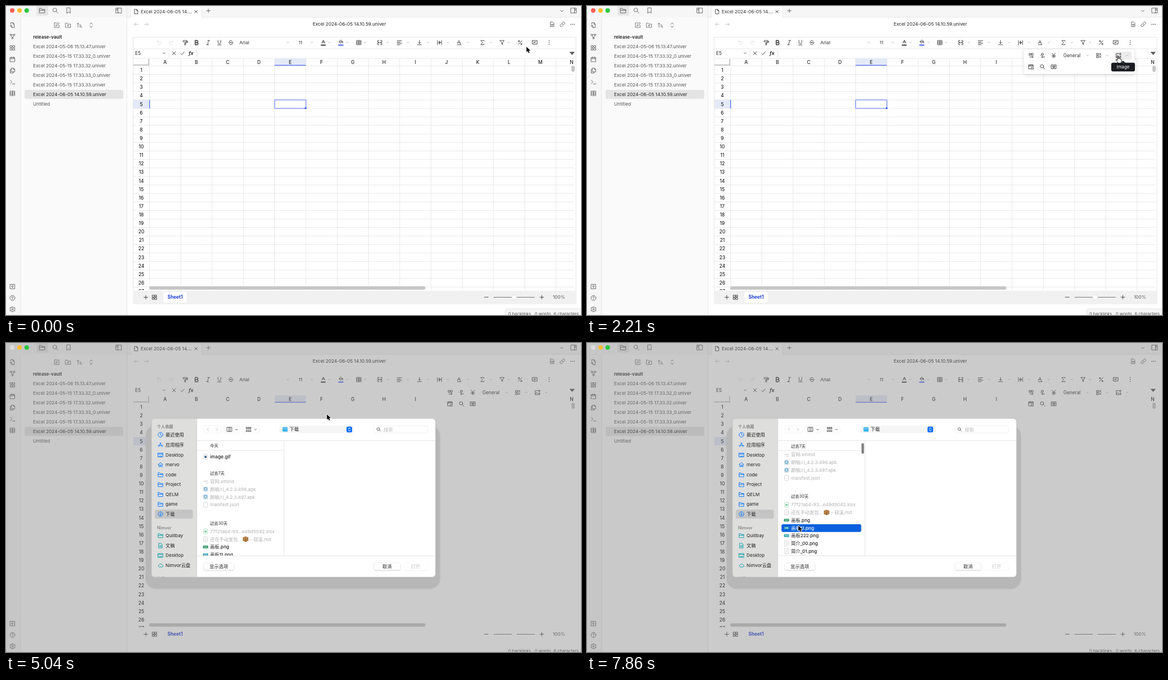
These frames come from a looping animation (1020x549 px, 8000 ms). An HTML page with a canvas:

```html
<!DOCTYPE html>
<html lang="zh-CN">
<head>
<meta charset="utf-8">
<title>Spreadsheet image upload</title>
<style>
html, body { margin: 0; width: 100%; height: 100%; overflow: hidden; background: #fff; }
canvas { display: block; width: 1020px; height: 549px; }
</style>
</head>
<body>
<canvas></canvas>
<script>
const W = 1020, H = 549, LOOP = 8000, STEP = 148.15;
const canvas = document.querySelector('canvas'), c = canvas.getContext('2d');
const ratio = window.devicePixelRatio || 1;
canvas.width = W * ratio;
canvas.height = H * ratio;

const FONT = 'Inter, "Noto Sans CJK SC", "Noto Sans CJK", sans-serif';
const INK = '#303030', BLUE = '#2c53f1', MAC = '#0a7aff', TEAL = '#10a0ab';

// Icon outlines on a 24 unit square
const ICONS = {
  chev: 'M5 8l7 7 7-7', left: 'M15 4l-8 8 8 8', right: 'M9 4l8 8-8 8',
  updown: 'M7 9l5-6 5 6M7 15l5 6 5-6', cross: 'M4 4l16 16M20 4L4 20', plus: 'M12 3v18M3 12h18',
  check: 'M3 13l6 6L21 5', minus: 'M3 12h18', back: 'M21 12H3M10 5l-7 7 7 7', fwd: 'M3 12h18M14 5l7 7-7 7',
  folder: 'M2 20V4h7l3 4h10v12zM2 11h20', folderPlus: 'M2 20V4h7l3 4h10v12zM12 11v6M9 14h6',
  search: 'M17 10a7 7 0 1 0-14 0 7 7 0 0 0 14 0M15 15l7 7', bookmark: 'M6 2h12v20l-6-5-6 5z',
  panel: 'M2 3h20v18H2zM9 3v18M4 7h3M4 11h3', panelR: 'M2 3h20v18H2zM15 3v18M17 7h3M17 11h3',
  file: 'M5 2h9l5 5v15H5zM14 2v6h5', fileSearch: 'M5 8V2h9l5 5v15H9M14 2v6h5M9 15a3 3 0 1 0-6 0 3 3 0 0 0 6 0M8 17l3 4',
  graph: 'M8 5a3 3 0 1 0-6 0 3 3 0 0 0 6 0M22 5a3 3 0 1 0-6 0 3 3 0 0 0 6 0M15 19a3 3 0 1 0-6 0 3 3 0 0 0 6 0M6 8l5 8M18 8l-5 8M8 5h8',
  apps: 'M3 3h7v7H3zM14 3h7v7h-7zM3 14h7v7H3zM14 14h7v7h-7z',
  calendar: 'M3 5h18v17H3zM3 10h18M8 2v5M16 2v5', copy: 'M8 2h9l4 4v11H8zM16 2v5h5M8 7H3v15h12v-5',
  terminal: 'M3 5l7 7-7 7M12 20h10', table: 'M3 3h18v18H3zM3 9h18M3 15h18M12 3v18',
  vault: 'M3 3h18v18H3zM12 7l3 4-3 6-3-6z', help: 'M22 12a10 10 0 1 0-20 0 10 10 0 0 0 20 0M9 9a3 3 0 1 1 4 3c-1 .5-1 1-1 2M12 17v1',
  gear: 'M15 12a3 3 0 1 0-6 0 3 3 0 0 0 6 0M10 2h4l1 3 3 1 3-1 1 4-2 3 2 3-1 4-3-1-3 1-1 3h-4l-1-3-3-1-3 1-1-4 2-3-2-3 1-4 3 1 3-1z',
  edit: 'M12 3H3v18h18v-9M9 15l1-5L19 2l3 3-8 9z', sort: 'M6 20V4M2 8l4-4 4 4M13 11h3M13 15h5M13 19h8',
  doc: 'M5 2h9l5 5v15H5zM8 12h8M8 16h8', link: 'M10 14a5 5 0 0 0 7 0l4-4a5 5 0 0 0-7-7l-2 2M14 10a5 5 0 0 0-7 0l-4 4a5 5 0 0 0 7 7l2-2',
  undo: 'M3 8h12a5 5 0 0 1 0 11H7M8 3L3 8l5 5', redo: 'M21 8H9a5 5 0 0 0 0 11h8M16 3l5 5-5 5',
  paint: 'M4 3h15v6H4zM19 6h3v6H12v3M10 15h4v7h-4z', bold: 'M6 3h7a4 4 0 0 1 0 9H6zM6 12h8a4 4 0 0 1 0 9H6z',
  italic: 'M10 3h9M5 21h9M14.5 3l-5 18', under: 'M6 2v9a6 6 0 0 0 12 0V2M4 22h16',
  strike: 'M18 7C16 1 4 2 6 8c1 3 4 3 6 4M2 12h20M5 17c2 6 15 5 13-2', letter: 'M5 16l7-14 7 14M8 11h8',
  bucket: 'M4 10l8-8 8 8-8 7zM4 10h16M21 13v4', merge: 'M9 3H3v6M15 3h6v6M3 15v6h6M21 15v6h-6M3 12h18M7 9v6M17 9v6',
  align: 'M2 4h20M2 10h13M2 15h20M2 21h13', bottom: 'M3 21h18M12 3v13M7 11l5 5 5-5',
  wrap: 'M3 3v18M21 3v18M7 12h10M13 8l4 4-4 4M11 5v14', rotate: 'M4 16l7-13 6 13M7 12h7M4 21h16l-3-3',
  sigma: 'M19 6V3H5l8 9-8 9h14v-3', filter: 'M3 3h18l-7 9v9l-4-3v-6z',
  percent: 'M4 20L20 4M10 6a3 3 0 1 0-6 0 3 3 0 0 0 6 0M20 18a3 3 0 1 0-6 0 3 3 0 0 0 6 0',
  comment: 'M2 3h20v15H14l-3 4-2-4H2zM7 9h10M7 13h6', decimals: 'M4 3h6v8H4zM14 3h6v8h-6zM6 18h14M16 15l4 3-4 3',
  decLess: 'M9 3h6v8H9zM4 11h1M8 18h13M12 15l-4 3 4 3', yen: 'M5 2l7 9 7-9M12 11v11M5 12h14M5 17h14',
  rules: 'M3 3h7v7H3zM3 14h7v7H3zM14 4h7M14 9h7M14 14l7 7M21 14l-7 7', image: 'M13 4H2v17h19v-9M2 18l6-6 5 5 3-3 5 4M15 5h8M19 1v8',
  tableLock: 'M11 21H2V4h20v7M2 9h20M8 2v5M16 2v5M14 15h8v7h-8z', keyboard: 'M2 4h20v16H2zM6 9h12M6 12h12M8 16h8',
  blocks: 'M3 3h8v8H3zM14 3h7v7h-7zM3 14h7v7H3zM14 13h7v8h-7z', clock: 'M22 12a10 10 0 1 0-20 0 10 10 0 0 0 20 0M12 5v7l5 3',
  tools: 'M4 20L13 3M11 3l9 17M2 15h20', desk: 'M2 4h20v16H2zM2 8h20M6 17h12', home: 'M2 12L12 3l10 9M5 10v11h5v-7h4v7h5V10',
  down: 'M22 12a10 10 0 1 0-20 0 10 10 0 0 0 20 0M12 6v11M8 13l4 4 4-4', cloud: 'M6 19a5 5 0 0 1 0-9 7 7 0 0 1 13 1 4 4 0 0 1 0 8z',
  columns: 'M2 3h20v18H2zM9 3v18M15 3v18', grid: 'M2 3h4v4H2zM10 3h4v4h-4zM18 3h4v4h-4zM2 11h20M2 17h4v4H2zM10 17h4v4h-4zM18 17h4v4h-4z'
};
const ARROW = new Path2D('M0 0V9.4L2.2 7.4 3.8 11 5.5 10.2 3.9 6.8H7Z');
const HAND = new Path2D('M-1 6V.6C-1-.6 1-.6 1 .6V4.4C2-.2 3.5 4 3.5 5 4 4 5 4.5 5 5.4 6 5 6.6 5.6 6.5 7 6.4 9 5.6 10 5.2 12H0C-.6 10-3 8-3.6 6.6-3.8 5.4-2.4 5-1 7Z');

function text(s, x, y, color = INK, { size = 8.2, weight = 400, align = 'left', style = '' } = {}) {
  c.font = `${style} ${weight} ${size}px ${FONT}`;
  c.textAlign = align;
  c.fillStyle = color;
  c.fillText(s, x, y + size * 0.36);
}
function box(x, y, x2, y2, fill, r = 0, stroke) {
  c.beginPath();
  c.roundRect(x, y, x2 - x, y2 - y, r);
  if (fill) { c.fillStyle = fill; c.fill(); }
  if (stroke) { c.strokeStyle = stroke; c.lineWidth = 0.8; c.stroke(); }
}
function line(x, y, x2, y2, color = '#e3e3e3', width = 0.8) {
  c.strokeStyle = color;
  c.lineWidth = width;
  c.beginPath();
  c.moveTo(x, y);
  c.lineTo(x2, y2);
  c.stroke();
}
function dot(x, y, r, color) {
  c.fillStyle = color;
  c.beginPath();
  c.arc(x, y, r, 0, 7);
  c.fill();
}
function icon(name, x, y, size = 10, color = INK, width = 0.85) {
  const k = size / 24;
  c.save();
  c.translate(x - size / 2, y - size / 2);
  c.scale(k, k);
  c.strokeStyle = color;
  c.lineWidth = width / k;
  c.lineCap = c.lineJoin = 'round';
  c.stroke(new Path2D(ICONS[name]));
  c.restore();
}
const icons = (list, y, size, color) => list.forEach(([name, x]) => icon(name, x, y, size, color));
const chevrons = (xs, y) => xs.forEach(x => icon('chev', x, y, 5.5, '#999', 0.7));
function dots(x, y, dx, dy) {
  for (const i of [-1, 0, 1]) dot(x + i * dx, y + i * dy, 0.8, INK);
}
function shadowed(blur, offset, alpha, draw) {
  c.save();
  c.shadowColor = `rgba(0,0,0,${alpha})`;
  c.shadowBlur = blur * ratio;
  c.shadowOffsetY = offset * ratio;
  draw();
  c.restore();
}
function clipped(x, y, x2, y2, draw) {
  c.save();
  c.beginPath();
  c.rect(x, y, x2 - x, y2 - y);
  c.clip();
  draw();
  c.restore();
}

const FILES = ['05-06 15.13.47', '05-15 17.33.32_0', '05-15 17.33.32', '05-15 17.33.33_0', '05-15 17.33.33', '06-05 14.10.59'];

function drawApp() {
  box(0, 0, W, H, '#fff');
  box(0, 0, 26, H, '#f6f6f6');
  box(26, 0, 214, H, '#fafafa');
  box(0, 0, 214, 20, '#f6f6f6');
  box(214, 0, W, 20, '#f6f6f6');
  line(26, 20, 26, H);
  line(214.5, 0, 214.5, H);
  line(214, 20, W, 20);
  box(221, 0, 347, 21, '#fff', [4, 4, 0, 0], '#e6e6e6');
  box(221.5, 19, 346.5, 22, '#fff');
  box(54, -2, 75, 17, '#e6e6e6', 3);
  icons([['folder', 64], ['search', 87.5], ['bookmark', 111], ['panel', 200], ['panelR', 1007]], 8, 11.5, '#555');
  icon('chev', 986, 9, 8, '#555');
  icons([['edit', 90], ['folderPlus', 110], ['sort', 130.5], ['updown', 151]], 34, 11, '#666');
  ['fileSearch', 'graph', 'apps', 'calendar', 'copy', 'terminal', 'table'].forEach((n, i) => icon(n, 11.5, 34 + i * 20.2, 10.5, '#555'));
  ['vault', 'help', 'gear'].forEach((n, i) => icon(n, 11.5, 498.5 + i * 20.2, 10.5, '#555'));

  text('release-vault', 48, 55, '#222', { size: 8, weight: 600 });
  box(33, 149, 208, 165, '#e4e4e4', 3);
  FILES.forEach((f, i) => text(`Excel 2024-${f}.univer`, 48, 72 + i * 16.95, i == 5 ? '#222' : '#555'));
  text('Untitled', 48, 174, '#555');

  icon('file', 231, 10, 9.5);
  text('Excel 2024-06-05 14....', 239, 10);
  icon('cross', 337, 10, 7);
  icon('plus', 359, 8.5, 9, '#555');
  icons([['back', 231], ['fwd', 249]], 32.5, 9, '#bbb');
  text('Excel 2024-06-05 14.10.59.univer', 609, 32.5, '#222', { align: 'center' });
  icons([['doc', 969], ['link', 987]], 32.5, 10, '#555');
  dots(1005, 32.5, 3, 0);
}

function drawToolbar(dim) {
  if (!dim) box(225.5, 55.5, 1011, 529, '#fff', 0, '#e0e0e0');
  const y = 65;
  icons([['undo', 272], ['redo', 293]], y, 10, '#dedede');
  icons([['paint', 318], ['italic', 358.5], ['under', 378.5], ['strike', 399], ['table', 626], ['merge', 663], ['align', 698],
    ['bottom', 733.5], ['wrap', 769], ['rotate', 804], ['sigma', 845], ['filter', 880], ['percent', 912], ['comment', 938]], y, 10);
  icon('bold', 338, y, 10, INK, 1.3);
  icon('letter', 563, 64.5, 9, INK, 1);
  icon('bucket', 594, 64, 9);
  line(558.5, 69.5, 567, 69.5, '#111', 1.6);
  line(589.5, 69.5, 598.5, 69.5, BLUE, 1.8);
  text('Arial', 414, y);
  text('11', 519, y);
  chevrons([500, 542.5, 574, 605.5, 637, 677, 713, 749, 784, 819, 860, 892], y);
  dots(963.5, y, 0, 3.3);
  if (!dim) for (const ly of [76, 93]) line(226, ly, 1011, ly);

  text('E5', 229, 84.3, INK, { size: 8.5 });
  icon('chev', 280.5, 84, 6);
  icons([['cross', 298], ['check', 313]], 84, 8.5);
  text('fx', 324, 84, '#222', { size: 9, weight: 600, style: 'italic' });
  if (!dim) for (const x of [289, 338.5]) line(x, 78, x, 91);
  c.fillStyle = '#555';
  c.fill(new Path2D('M999.5 81.5h9.5l-4.7 5.5z'));
}

const colX = i => 254.7 + 55.47 * i, rowY = i => 106.4 + 15.11 * i;

function drawSheet(dim) {
  clipped(226, 93, 1010, 505, () => {
    box(colX(4), 93, colX(5), 106, '#e5eaf8');
    box(226, rowY(4), 254.7, rowY(5), '#e5eaf8');
    if (!dim) {
      for (let i = 0; i < 14; i++) line(colX(i), 93, colX(i), 505);
      for (let i = 0; i < 27; i++) line(226, rowY(i), 1008, rowY(i));
    }
    const head = { size: 8.4, weight: 500, align: 'center' };
    for (let i = 0; i < 14; i++) text(String.fromCharCode(65 + i), colX(i) + 27.6, 100, '#222', head);
    for (let i = 0; i < 27; i++) text(i + 1, 240, rowY(i) + 7.7, '#222', head);
    line(226, 104.7, 254, 104.7, '#c4c4c4', 1.8);
    line(253, 94, 253, 105.5, '#c4c4c4', 1.8);
    line(colX(4), 105.3, colX(5), 105.3, BLUE, 1.1);
    line(254.8, rowY(4), 254.8, rowY(5), BLUE, 1.1);
    box(colX(4), rowY(4), colX(5), rowY(5), null, 0, BLUE);
    box(530.2, 180.2, 533, 183, BLUE);
  });
  box(254, 498, 744, 504, '#c6c6c6', 3);
  box(1003, 106, 1009, 117, '#c6c6c6', 3);

  box(225, 506, 1011, 529, dim ? '#fff' : '#f1f1f1');
  icon('plus', 248, 517.5, 9);
  icon('blocks', 263.5, 517.5, 10);
  box(279, 508, 320.5, 527, '#fff', 3);
  text('Sheet1', 300, 517.5, '#1f3fd6', { size: 8.3, weight: 700, align: 'center' });
  icon('minus', 852, 517.3, 9);
  icon('plus', 950.5, 517.3, 9);
  line(865, 517.5, 938, 517.5, '#777', 1);
  dot(901.5, 517.5, 4.4, '#fff');
  if (!dim) { c.strokeStyle = '#ddd'; c.stroke(); }
  text('100%', 970, 517.3, '#555', { size: 8.2 });

  if (!dim) box(886, 538, 1024, 553, '#f6f6f6', 4, '#e0e0e0');
  [['0 backlinks', 891], ['0 words', 938], ['6 characters', 971.5]].forEach(([s, x]) => text(s, x, 546.8, '#555', { size: 7.5 }));
}

function drawMorePanel(dim, hover) {
  shadowed(dim ? 0 : 6, dim ? 0 : 1.5, dim ? 0 : 0.15, () => box(775, 77, 971, 121, '#fff', 4));
  if (hover) box(936, 81, 966, 95.5, '#ececec', 3);
  icons([['decimals', 788], ['decLess', 808], ['yen', 828], ['rules', 908], ['image', 943]], 88, 10);
  text('General', 845, 88, INK, { size: 8.3 });
  chevrons([888, 923, 958.5], 88);
  icons([['tableLock', 787.5], ['search', 808], ['keyboard', 828]], 108, 10);
}

function tooltip(label, x, y, half) {
  box(x - half, y, x + half, y + 15.5, '#191c22', 3);
  c.fill(new Path2D(`M${x - 4} ${y}l4-3.5 4 3.5z`));
  text(label, x, y + 7.8, '#fff', { size: 7.9, align: 'center' });
}

const PLACES = [
  ['clock', '最近使用', 163], ['tools', '应用程序', 181], ['desk', 'Desktop', 199], ['home', 'mervo', 216], ['folder', 'code', 234],
  ['folder', 'Project', 251.5], ['folder', 'QELM', 269], ['folder', 'game', 286.5], ['down', '下载', 304],
  ['folder', 'Quillbay', 342, TEAL], ['doc', '文稿', 360, TEAL], ['desk', 'Desktop', 377.5, TEAL], ['cloud', 'Nimvor云盘', 395, TEAL]
];
const ROWS = [
  ['image.gif', 202, 'gif'], ['官网.xmind', 246, 'mind'], ['朗榆川_4.2.3.496.apk', 259.8, 'apk'], ['朗榆川_4.2.3.497.apk', 273.6, 'apk'],
  ['manifest.json', 287.4, 'doc'], ['77f21ab4-93...e49d5042.xlsx', 334.8, 'xlsx'], ['还在手动发包...', 348.6, 'md'], ['画板.png', 362.4, 'png'],
  ['画板11.png', 376.2, 'png'], ['画板222.png', 390, 'png'], ['简介_00.png', 403.8, 'page'], ['简介_01.png', 417.6, 'page']
];
const GROUPS = [['今天', 182], ['过去7天', 231], ['过去30天', 320]];

function fileIcon(kind, y, hue) {
  const x = 354;
  if (kind == 'png') {
    box(x - 4.5, y - 2.3, x + 4.5, y + 2.3, hue);
    line(x - 3, y, x + 3, y, '#e8f8f2', 1);
  } else if (kind == 'apk') {
    box(x - 4.5, y - 4.5, x + 4.5, y + 4.5, '#d5e2ea', 2);
    dot(x, y - 0.5, 3.3, '#86b9d8');
    dot(x, y - 0.5, 1.3, '#eef6fa');
  } else if (kind == 'mind') {
    line(x - 4, y, x + 4, y - 1, '#c4c4c4', 1);
    line(x, y + 2.5, x + 4, y + 2.5, '#c4c4c4', 1);
  } else {
    box(x - 3.4, y - 4.5, x + 3.4, y + 4.5, '#fff', 0.7, kind == 'xlsx' ? '#a4d8b9' : '#cfcfcf');
    if (kind == 'gif') { box(x - 2, y - 1.8, x + 2, y + 2, '#4d83b6'); dot(x, y + 1, 1, '#273c50'); }
    if (kind == 'xlsx') box(x - 2, y - 1.5, x + 2, y + 2, '#8dd0a8');
    if (kind == 'page' || kind == 'md') for (const d of [-1.5, 0.5, 2.5]) line(x - 2, y + d, x + 2, y + d, '#d2d2d2', 0.6);
  }
}

function drawFileList(scroll, selected) {
  clipped(339, 174, 492.5, 378, () => {
    ROWS.forEach(([name, top, kind], i) => {
      const y = top - scroll, picked = selected && i == 8, enabled = i == 0 || i > 6;
      const color = picked ? '#fff' : enabled ? '#222' : '#b0b0b0';
      if (picked) box(345, 322, 486.5, 335.7, '#0a60de', 3);
      fileIcon(kind, y, i == 7 ? '#249060' : '#2d9db4');
      text(name, 362, y, color, { weight: enabled ? 500 : 400 });
      if (kind == 'md') {
        c.fillStyle = '#b5814a';
        c.fill(new Path2D(`M420 ${y - 3}l5-2 5 2v6l-5 2-5-2z`));
        line(425, y - 1, 425, y + 4.5, '#7a5230');
        text('- 砚溪.md', 433, y, color);
      }
    });
    box(339, 174, 492, 191, '#fff');
    GROUPS.forEach(([name, top], i) => {
      const y = Math.max(182.5, top - scroll), next = GROUPS[i + 1];
      if (next && next[1] - scroll < 190) return;
      text(name, 362, y, '#666', { size: 7.2, weight: 600 });
    });
    line(339, 191, 492, 191, '#dedede');
    if (scroll) box(487, 178, 491.3, 197, '#808080', 2.2);
  });
}

function drawDialog(scroll, selected) {
  shadowed(3, 0, 0.1, () => box(248, 147, 769.5, 436.5, '#b7b7b7', 18));
  box(258, 134, 762, 416, '#fff', 6);
  box(258, 134, 338.5, 416, '#dededd', [6, 0, 0, 6]);
  box(258, 134, 762, 416, null, 6, '#bdbdbd');
  line(338.5, 134.5, 338.5, 415.5, '#cfcfcf');

  const label = { size: 7.1, weight: 600 };
  text('个人收藏', 268, 148.5, '#858585', label);
  text('Nimvor', 268, 328, '#858585', { ...label, size: 7.3 });
  clipped(258, 400, 338, 415.5, () => text('位置', 268, 418, '#858585', label));
  box(264, 296, 331.5, 312, '#c5c5c5', 3);
  PLACES.forEach(([name, s, y, color = MAC]) => {
    icon(name, 274, y, 10, color, 0.95);
    text(s, 283, y, '#222', { size: 8.2 });
  });

  for (const [x, x2] of [[351, 382], [386, 415], [420, 449]]) box(x, 147, x2, 160, '#fff', 3, '#f0f0f0');
  icons([['left', 358.5], ['right', 374]], 153.5, 8, '#b5b5b5');
  icons([['columns', 396.5], ['grid', 430.5]], 153.5, 10, '#444');
  icons([['chev', 409], ['chev', 442.5]], 154, 6, '#333');
  box(485, 147, 617, 160, '#f5f5f5', 3);
  box(490.5, 149.5, 499.5, 157.5, '#3db4ea', 1.3);
  line(491, 152, 499, 152, '#a5ddf6');
  text('下载', 503, 153.5, '#222', { size: 8.3 });
  box(604, 148.5, 614, 158.7, '#0a70f8', 2.5);
  icon('updown', 609, 153.6, 8, '#fff', 1);
  box(652.5, 147.5, 748, 160, '#fff', 3, '#eeeeee');
  icon('search', 661, 153.5, 8, '#444');
  text('搜索', 670, 153.7, '#bcbcbc', { size: 8.2 });

  line(339, 173.5, 761.5, 173.5, '#dcdcdc');
  drawFileList(scroll, selected);
  line(493, 174, 493, 378, '#dcdcdc');
  line(339, 378, 761.5, 378, '#dcdcdc');
  [['显示选项', 351, 404, '#222'], ['取消', 653, 699, '#222'], ['打开', 705, 748, '#c3c3c3']].forEach(([s, x, x2, color]) => {
    shadowed(2, 0.5, color == '#222' ? 0.3 : 0.08, () => box(x, 391, x2, 403.5, '#fff', 3));
    text(s, (x + x2) / 2, 397, color, { size: 8.2, align: 'center' });
  });
}

// Pointer path: step, x, y
const POINTER = [
  [0, 923.3, 72.5], [2, 940, 56], [3, 952, 54], [5, 964, 66], [8, 964, 66], [10, 935, 84], [12, 888, 91], [15, 942, 89.5],
  [20, 942, 89.5], [23, 960, 111], [25, 960, 111], [26, 850, 120], [28, 587.5, 116], [29, 587.5, 116], [30, 589.3, 115.3],
  [33, 589.3, 115.3], [34, 569.3, 126.8], [37, 500, 225], [40, 401, 334], [41, 401, 334], [43, 391.5, 360], [48, 391.5, 360], [51, 375, 324.5], [54, 375, 324.5]
];
function pointerAt(step) {
  const i = Math.max(1, POINTER.findIndex(p => p[0] >= step));
  const [t0, x0, y0] = POINTER[i - 1], [t1, x1, y1] = POINTER[i];
  const u = (step - t0) / (t1 - t0);
  return [x0 + (x1 - x0) * u, y0 + (y1 - y0) * u];
}
function drawPointer(step) {
  const hand = step >= 4 && step < 26, shape = hand ? HAND : ARROW;
  c.save();
  c.translate(...pointerAt(step));
  c.lineJoin = 'round';
  c.lineWidth = hand ? 1 : 1.6;
  c.strokeStyle = hand ? '#111' : '#fff';
  c.fillStyle = hand ? '#fff' : '#000';
  if (hand) { c.fill(shape); c.stroke(shape); }
  else { c.stroke(shape); c.fill(shape); }
  c.restore();
}

function draw(now) {
  const step = Math.min(53, Math.floor((now % LOOP + 15) / STEP));
  const during = (from, to) => step >= from && step < to;
  const dim = step >= 34;
  c.setTransform(ratio, 0, 0, ratio, 0, 0);
  drawApp();
  drawToolbar(dim);
  if (during(4, 9)) { box(957, 58, 971, 73, '#e9e9e9', 3); dots(963.5, 65, 0, 3.3); }
  drawSheet(dim);
  if (step >= 7) drawMorePanel(dim, during(14, 22));
  if (during(5, 9)) tooltip('More', 963.5, 78.3, 19.5);
  if (during(15, 18)) tooltip('Image', 951, 100.8, 21);
  if (during(18, 26)) {
    shadowed(4, 1, 0.15, () => box(931, 100, 1002, 130, '#fff', 3));
    if (step >= 22) box(936, 104, 996, 124, '#efefef', 3);
    text('Float Image', 942, 114.5);
  }
  if (dim) {
    // The inactive window turns grey and loses contrast
    box(0, 0, W, H, 'rgba(131,131,131,0.42)');
    const u = Math.min(1, Math.max(0, (step - 45) / 4));
    drawDialog(47.6 * (1 - (1 - u) ** 2), step >= 53);
  }
  dot(11, 8, 4, dim ? '#dcdcdc' : '#fe5f57');
  dot(24, 8, 4, '#febc2e');
  dot(36.7, 8, 4, '#28c840');
  drawPointer(step);
  requestAnimationFrame(draw);
}
requestAnimationFrame(draw);
</script>
</body>
</html>
```
